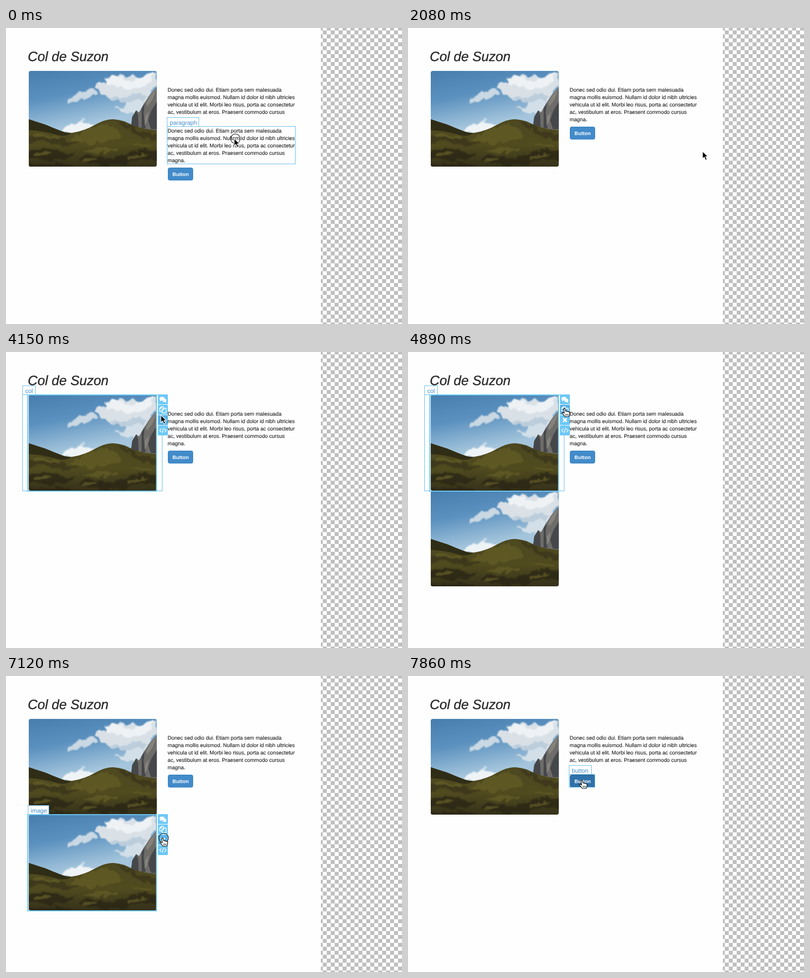
Animation of 800x600 px, one loop 8000 ms. Source, as an HTML page:

```html
<!DOCTYPE html>
<html lang="en">
<head>
<meta charset="utf-8">
<title>Page builder</title>
<style>
html, body { margin: 0; width: 100%; height: 100%; overflow: hidden; background: #fefefe; }
svg { display: block; width: 800px; height: 600px; }
text { font-family: "Liberation Sans", Arial, sans-serif; text-rendering: geometricPrecision; }
.title { font-size: 27.2px; font-style: italic; fill: #2b2b2b; stroke: #2b2b2b; stroke-width: .4; }
.copy { font-size: 10.68px; fill: #1a1a1a; stroke: #1a1a1a; stroke-width: .1; }
.btn rect { fill: #428bca; stroke: #357ebd; }
.btn text { font-size: 10.2px; font-weight: bold; fill: #fff; }
.btn.hot rect { fill: #3071a9; stroke: #285e8e; }
#hover rect { fill: none; stroke: #62bdec; }
#hover #tag { fill: #fff; }
#hover text { font-size: 12px; fill: #428bca; }
#frame { fill: none; stroke: #6dc8f6; stroke-width: 2; }
.tool { fill: #6dc8f6; }
.tool.hot { fill: #58b2e4; }
.glyph { fill: none; stroke: #fff; stroke-width: 1.3; stroke-linejoin: round; }
</style>
</head>
<body>
<svg viewBox="0 0 800 600">
  <defs>
    <pattern id="checker" x="640" y="5" width="16" height="16" patternUnits="userSpaceOnUse">
      <rect width="16" height="16" fill="#fff"/>
      <path d="M0 0h8v16h8v-8H0z" fill="#bfbfbf"/>
    </pattern>
    <linearGradient id="sky" x1="0" y1="0" x2=".25" y2="1">
      <stop offset="0" stop-color="#467dae"/>
      <stop offset=".3" stop-color="#5b91bf"/>
      <stop offset=".62" stop-color="#a4c5dc"/>
    </linearGradient>
    <linearGradient id="grass" x1="0" y1="0" x2="0" y2="1">
      <stop offset="0" stop-color="#4c4820"/>
      <stop offset=".55" stop-color="#504a1f"/>
      <stop offset="1" stop-color="#35311a"/>
    </linearGradient>
    <filter id="ragged" x="-10%" y="-10%" width="120%" height="120%">
      <feTurbulence type="fractalNoise" baseFrequency=".06" numOctaves="3" seed="4"/>
      <feDisplacementMap in="SourceGraphic" scale="16" xChannelSelector="R" yChannelSelector="G"/>
      <feGaussianBlur stdDeviation="1"/>
    </filter>
    <clipPath id="round"><rect width="258.5" height="194" rx="4"/></clipPath>
    <g id="photo" clip-path="url(#round)">
      <rect width="259" height="194" fill="url(#sky)"/>
      <g filter="url(#ragged)">
        <path fill="#d9e1e7" d="M134 32l8-12 14 5 12-14 16-5 12 6 14-4 14 6 16-5 20-2v22l-14 10-2 16-14 8-14 1-26-2-22-3-12-10-12-3z"/>
        <path fill="#c9d8e3" d="M78 64l10-16 18-2 12-8 14 1 4 8-10 5-8 6-16 2-12 5z"/>
        <path fill="#d3dfe8" d="M174 76l14-4 8-8 22-2 13 1 3 12-10 8-16 6-14-6z"/>
        <path fill="#eef3f6" d="M64 128l8-9 16-10 14-7 14-1 16 6 8 2-30 19z"/>
        <path fill="#eef2f4" d="M156 16l16-6 16 2 8 10 16-4 18-8 24-4-8 14-18 14-24 4-20-6-20-4z"/>
        <path fill="#bccddb" d="M160 50l30 4 20-6 28 2-10 10-30 4-24-4z"/>
      </g>
      <path fill="#6d6c69" d="M206 118l3-25 8-13 6 4 7-13 14-22 16-18v90z"/>
      <path fill="#45474a" d="M206 118l3-25 8-13 4 9 1 29zM228 76l6-10-2 20 4 30h-8zM259 62l-12 20-6 18 6 18h14z"/>
      <path fill="#85827c" d="M245 50l13-14-8 22-10 14-3-6zM234 94l8-12-2 20-6 8z"/>
      <path fill="url(#grass)" d="M0 98q18 6 34 11 16 7 32 13 14 5 24 3 24-4 44-16 22-12 37-11 20 1 38 12 24 9 50 10v74H0z"/>
      <path fill="#302d16" d="M0 98q18 6 34 11 16 7 32 13 10 4 20 4-10 8-28 4-30-9-58-10z"/>
      <g filter="url(#ragged)" opacity=".8">
        <path fill="#3a361a" d="M0 132q40-8 70 6 22 10 42 4-24 14-54 8-28-8-58-4zM174 102q22 2 40 16 22 12 45 12v10q-34-4-54-18-12-14-31-20z"/>
        <path fill="#625c27" d="M86 138q32-22 74-34 10 10 30 28-30 14-60 16-28 0-44-10zM10 124q30 2 54 12-24 2-54-4zM106 162q40-8 76-4-28 14-76 4zM206 146q20 0 44 8-24 6-44-8z"/>
        <path fill="#292714" d="M-8 164q34-14 60-4 18 8 38 8-12 12-30 14-30 0-68-4zM100 180q20-14 44-8 26 8 50-2 30-14 74-8v18q-49-4-77 8-40 10-91-8zM-8 190q58-8 98 2l10 8H-8z"/>
        <path fill="#5b5426" d="M10 168q20-8 38-2-18 4-38 10zM108 180q16-10 34-4-14 4-34 10zM200 174q22-10 46-6-22 4-46 14z"/>
      </g>
    </g>
    <g id="arrow">
      <path d="M0 0v15l3.5-3.2 2.6 6 2.8-1.2-2.6-5.8H11z" fill="#000" stroke="#fff" stroke-width="1.1"/>
    </g>
    <g id="hand">
      <path d="M-1.5 1.2Q0-.4 1.6 1.2L2.4 6q2-1 3 .6 2-.6 2.8.8 2.4-.6 2.5 1.8 0 4-1.8 7.8H1.2Q-1 13.6-4.3 10.4-5.4 8.4-3.2 8.2L-.3 10z" fill="#fff" stroke="#000" stroke-width="1.2" stroke-linejoin="round"/>
      <path d="M2.6 11.5v3.6M4.9 11.5v3.6M7.2 11.5v3.6" stroke="#000" stroke-width=".9"/>
    </g>
    <g id="comments" fill="#fff">
      <path d="M13 8.5q4 .5 4 3.5 0 1.6-1.2 2.6l1.2 2q-2-.2-3.4-1.3-4 .3-5.6-1.5 5.2-.6 5-5.3z"/>
      <path d="M8.2 4.8c3.2 0 5.2 1.7 5.2 3.9s-2.2 3.9-5.2 3.9l-1.5-.1q-1.400 1.300-3.200 1.400l1.200-2.100Q3 10.600 3 8.700c0-2.200 2.100-3.900 5.200-3.900z"/>
    </g>
    <path id="copies" class="glyph" d="M8.5 13h-5V7l3-3H11v3M6.8 4v3H3.500M8.500 10l3-3h5v9.500h-8zM11.700 7v3H8.500"/>
    <path id="cross" d="M6.300 6.300l7.400 7.400m0-7.400l-7.400 7.400" stroke="#fff" stroke-width="3"/>
    <path id="code" class="glyph" d="M7 6.500L3.300 10 7 13.500M13 6.500l3.700 3.500-3.700 3.500M11.300 5L8.700 15"/>
  </defs>

  <rect width="800" height="600" fill="#fefefe"/>
  <rect x="636" width="164" height="600" fill="url(#checker)"/>
  <text class="title" x="44" y="67">Col de Suzon</text>
  <use href="#photo" x="46" y="87"/>
  <use id="photo2" href="#photo" x="46" y="281"/>
  <g id="para" class="copy"></g>
  <use id="para2" href="#para" y="83"/>
  <g id="btn" class="btn">
    <rect x="327.5" y="200.5" width="50" height="25" rx="3"/>
    <text x="336.3" y="217">Button</text>
  </g>
  <g id="hover"><rect id="edge"/><rect id="tag" height="18"/><text id="name"></text></g>
  <g id="select"><rect id="frame"/><g id="tools"></g></g>
  <g id="cursor">
    <circle id="ring" cx="2.5" cy=".5" r="9.7" fill="none" stroke="#111" stroke-width="1.1"/>
    <use id="pointer"/>
  </g>
</svg>
<script>
const $ = id => document.getElementById(id);
const NS = "http://www.w3.org/2000/svg";
const LOOP = 8000, TICKS = 54;

function set(el, attrs) {
  for (const k in attrs) el.setAttribute(k, attrs[k]);
  return el;
}
const add = (parent, tag, attrs) => parent.appendChild(set(document.createElementNS(NS, tag), attrs));
const show = (el, on) => { el.style.display = on ? "" : "none"; };

["Donec sed odio dui. Etiam porta sem malesuada",
 "magna mollis euismod. Nullam id dolor id nibh ultricies",
 "vehicula ut id elit. Morbi leo risus, porta ac consectetur",
 "ac, vestibulum at eros. Praesent commodo cursus",
 "magna."].forEach((line, i) => {
  add($("para"), "text", { x: 326.5, y: 129 + 15 * i }).textContent = line;
});

const tools = ["comments", "copies", "cross", "code"].map((icon, i) => {
  const g = add($("tools"), "g", { transform: `translate(0 ${21 * i})` });
  const rect = add(g, "rect", { class: "tool", width: 20, height: 20, rx: 1 });
  add(g, "use", { href: "#" + icon });
  return rect;
});

// label, label width, x, y, width, height
const boxes = {
  para: ["paragraph", 64, 325, 199, 260, 76],
  photo: ["image", 42, 44, 86, 260, 195],
  photo2: ["image", 42, 44, 280, 260, 195],
  button: ["button", 45, 325, 199, 53, 26],
  col: ["col", 26, 33, 86, 283, 195],
  row: ["row", 29, 33, 78, 564, 210]
};

// tick, hovered box, selected box
const states = [
  [0, "para"], [3, "para", "para"], [12], [15, "row"], [19, "photo"],
  [23, "photo", "photo"], [27, "col", "photo"], [37, "photo", "photo"],
  [39, "photo2", "photo"], [41, "photo2", "photo2"], [49], [52, "row"], [53, "button"]
];

// tick, x, y
const path = [
  [0, 461, 224], [3, 461, 224], [5, 522, 236], [6, 522, 236], [10, 595, 250],
  [14, 595, 250], [21, 262, 145], [25, 262, 145], [28, 313, 128], [30, 316, 114],
  [36, 316, 114], [39, 288, 356], [42, 286, 360], [43, 290, 357], [44, 290, 357],
  [47, 316, 328], [49, 316, 328], [52, 346, 258], [53, 351, 211]
];

const clicks = [0, 11, 23, 32, 41, 48];
const hands = [[9, 14], [29, 37], [47, 49], [53, 54]];
const within = (n, a, b) => n >= a && n < b;

function cursorAt(n) {
  const i = Math.max(1, path.findIndex(p => p[0] >= n));
  const [t0, x0, y0] = path[i - 1], [t1, x1, y1] = path[i];
  const k = (n - t0) / (t1 - t0);
  return [Math.round(x0 + (x1 - x0) * k), Math.round(y0 + (y1 - y0) * k)];
}

function drawHover(key) {
  show($("hover"), key);
  if (!key) return;
  const [label, tagWidth, x, y, w, h] = boxes[key];
  set($("edge"), { x: x + .5, y: y + .5, width: w - 1, height: h });
  set($("tag"), { x: x + .5, y: y - 17.5, width: tagWidth });
  set($("name"), { x: x + 6, y: y - 3 }).textContent = label;
}

function drawSelect(key, cx, cy) {
  show($("select"), key);
  if (!key) return;
  const [, , x, y, w, h] = boxes[key];
  const left = x + w + 3;
  set($("frame"), { x, y: y + 1, width: w, height: h });
  set($("tools"), { transform: `translate(${left} ${y})` });
  tools.forEach((tool, i) => {
    const top = y + 21 * i;
    tool.classList.toggle("hot", within(cx, left, left + 20) && within(cy, top, top + 20));
  });
}

function draw(n) {
  const [, hover, selected] = states.filter(s => s[0] <= n).pop();
  const [x, y] = cursorAt(n);
  const twoParas = n < 12;
  show($("para2"), twoParas);
  show($("photo2"), within(n, 32, 49));
  set($("btn"), { transform: `translate(0 ${twoParas ? 83 : 0})` });
  $("btn").classList.toggle("hot", hover === "button");
  drawHover(hover);
  drawSelect(selected, x, y);
  set($("cursor"), { transform: `translate(${x} ${y})` });
  set($("pointer"), { href: hands.some(([a, b]) => within(n, a, b)) ? "#hand" : "#arrow" });
  show($("ring"), clicks.includes(n));
}

let start, last = -1;
function frame(now) {
  start ??= now;
  const t = (now - start) % LOOP;
  const n = Math.min(TICKS - 1, Math.floor((t + 8) * TICKS / LOOP));
  if (n !== last) draw(last = n);
  requestAnimationFrame(frame);
}
draw(0);
requestAnimationFrame(frame);
</script>
</body>
</html>
```
